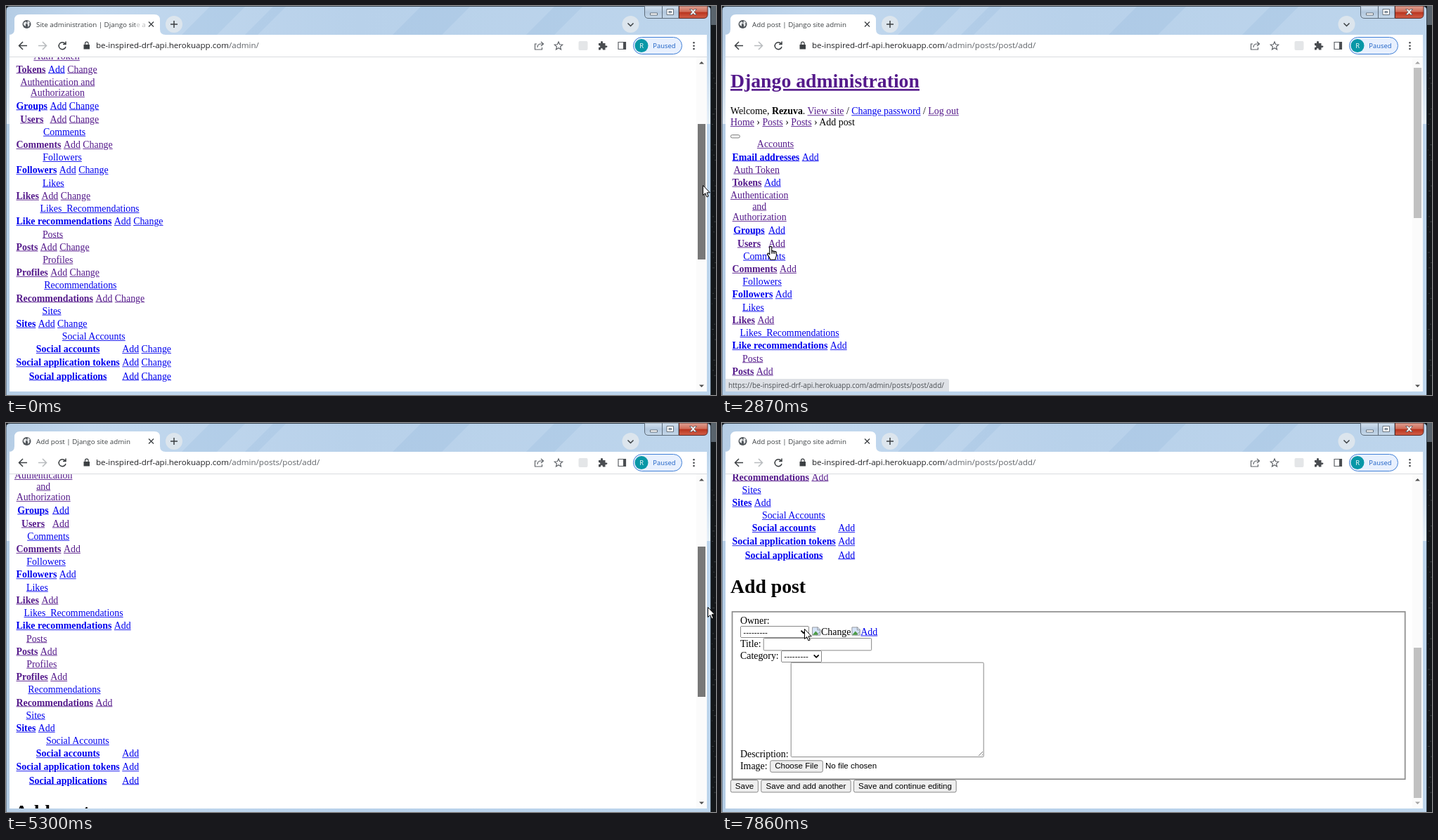
Write an HTML page that moves like this. It is 1010 by 554 pixels and loops after 8000 ms.

```html
<!DOCTYPE html>
<html lang="en">
<head>
<meta charset="utf-8">
<title>Admin walkthrough</title>
<style>
html, body { margin: 0; width: 100%; height: 100%; overflow: hidden; }
#stage { position: absolute; left: 0; top: 0; width: 1010px; height: 554px; overflow: hidden; background: #14171a; }
svg.layer { position: absolute; left: 0; top: 0; }
svg text { font-family: "Open Sans", "Noto Sans", sans-serif; }
#view { position: absolute; left: 5px; top: 73px; width: 992px; height: 476px; overflow: hidden; background: #fff; }
.page { position: absolute; left: 0; top: 0; width: 1111px; padding: 0 8px; transform-origin: 0 0;
  font: 16px/18px "Liberation Serif", "Times New Roman", serif; color: #000; }
.page h1 { font-size: 32px; line-height: 37px; margin: 21.44px 0; }
u { color: #00e; }
u.v { color: #551a8b; }
table { border-spacing: 2px; }
th, td { padding: 1px; line-height: 18px; }
.toggle { height: 18px; position: relative; }
.toggle i, button, input { box-sizing: border-box; background: #efefef; border: 1px solid #767676; border-radius: 3px; }
.toggle i { position: absolute; top: 11px; width: 16px; height: 6px; }
.at { position: absolute; white-space: pre; box-sizing: border-box; margin: 0; }
button, input, select, textarea, .sans { font: 13.333px "Liberation Sans", Arial, sans-serif; color: #000; padding: 0; }
input, textarea { background: #fff; border: 1px solid #767676; border-radius: 2px; }
.fields { border: 2px solid #8e8e8e; }
.broken { width: 16px; height: 16px; vertical-align: -2px; }
</style>
</head>
<body>
<div id="stage">
  <svg class="layer" width="1010" height="554">
    <defs>
      <linearGradient id="glass" x2="1" y2="0">
        <stop offset="0" stop-color="#b5cde5"/><stop offset=".12" stop-color="#c2d8ee"/>
        <stop offset=".5" stop-color="#b8d1ea"/><stop offset="1" stop-color="#bdd5ec"/>
      </linearGradient>
      <linearGradient id="sheen" gradientUnits="userSpaceOnUse" x1="0" y1="40" x2="0" y2="168">
        <stop offset="0" stop-color="#fff" stop-opacity="0"/><stop offset="1" stop-color="#fff" stop-opacity=".65"/>
      </linearGradient>
      <linearGradient id="close" x2="0" y2="1">
        <stop offset="0" stop-color="#e0a193"/><stop offset=".48" stop-color="#cf6b57"/>
        <stop offset=".5" stop-color="#b8321c"/><stop offset="1" stop-color="#d2614a"/>
      </linearGradient>
      <linearGradient id="cap" x2="0" y2="1">
        <stop offset="0" stop-color="#d5e3f1"/><stop offset=".5" stop-color="#b3c8de"/><stop offset="1" stop-color="#c5d8ea"/>
      </linearGradient>
    </defs>
    <path d="M1003 0h7v27h-7z" fill="#59636c"/>
    <g id="specks" fill="#50565b"></g>
    <path d="M0 554V6Q0 .5 6 .5H997Q1002.500 .5 1002.500 6V554" fill="url(#glass)" stroke="#35414d"/>
    <path d="M290 1h50l-40 40h-50zM380 1h18l-40 40h-18zM590 1h70l-40 40h-70zM780 1h40l-40 40h-40z" fill="#86aed6" opacity=".2"/>
    <path d="M1 40h4v128H1zM997 40h5v128h-5z" fill="url(#sheen)"/>
    <path d="M5 41H4Q12 41 12 33V20Q12 12 20 12H211Q219 12 219 20V33Q219 41 227 41H997V73H5z" fill="#fff"/>
    <path d="M5 72.500H997" stroke="#d9dce0"/>
    <circle cx="29.500" cy="26" r="6" fill="#50555a"/>
    <path d="M25 24l3-2 2 2-2 2v3l-3-2zM31 21l3 2-1 3 1 1-3 3v-3l-1-2z" fill="#e4e6e8"/>
    <text id="title" x="43" y="29.600" font-size="9.800" fill="#3c4043"></text>
    <path id="fade" d="M184 16h14v20h-14z" fill="#fff" opacity=".65"/>
    <path d="M203 22.500l7 7m0-7l-7 7" stroke="#3c4043" stroke-width="1.300"/>
    <g fill="#dce5ed"><circle cx="239" cy="26" r="12"/><circle cx="888.500" cy="26" r="12"/></g>
    <g fill="none" stroke="#3c4043" stroke-width="1.500">
      <path d="M234 26h10M239 21v10M884.500 24.500l4 4 4-4"/>
      <path d="M30 56.500H19M24 51l-5.500 5.500L24 62"/>
      <path d="M46 56.500H57M52 51l5.500 5.500L52 62" stroke="#b8bbbe"/>
      <path d="M84 53.500a5 5 0 1 0 1 4.500M85 50.500v4h-4"/>
      <path d="M112.500 55v-1.500a2.300 2.300 0 0 1 4.600 0V55" stroke-width="1.200"/>
      <g stroke="#5f6368" stroke-width="1.200">
        <path d="M755 54h-2.500v8h10v-3M756 59q0-5 5-5h3M761 51l3.500 3-3.500 3"/>
        <path d="M786 51l1.600 3.800 4.100.400-3.100 2.700.900 4-3.500-2.100-3.500 2.100.900-4-3.100-2.700 4.100-.400z"/>
        <path d="M871 51.500h10.500v10H871z"/>
      </g>
    </g>
    <path d="M110.500 55h8.500v6.500h-8.500z" fill="#3c4043"/>
    <path d="M878 51h4v11h-4z" fill="#4a4d51"/>
    <rect x="814.500" y="50" width="13" height="13" rx="2" fill="#e4e6e8"/>
    <path d="M843 53h3q-.500-3 1.500-3t1.500 3h3.500v3.500q3-.500 3 1.300t-3 1.400V62.500h-3.500q0-2.600-1.600-2.600t-1.600 2.600H843V59q2.400 0 2.400-1.500T843 56z" fill="#4a4d51"/>
    <g fill="#4a4d51"><circle cx="978.500" cy="52.300" r="1.300"/><circle cx="978.500" cy="56.700" r="1.300"/><circle cx="978.500" cy="61.100" r="1.300"/></g>
    <rect x="892.500" y="44.500" width="69" height="24" rx="12" fill="#e8f0fe" stroke="#3f7fd6"/>
    <circle cx="904" cy="56.500" r="9.500" fill="#0897a7"/>
    <text x="901.200" y="60" font-size="9.400" fill="#fff">R</text>
    <text x="920.300" y="59.900" font-size="9.400" fill="#1a5fc4">Paused</text>
    <text y="60.200" x="128" font-size="11.580" fill="#202124">be-inspired-drf-api.herokuapp.com<tspan id="path" fill="#5f6368"></tspan></text>
    <path d="M908.500 0V12Q908.500 17.500 914 17.500H957V0z" fill="url(#cap)" stroke="#5d6c7b"/>
    <path d="M957.500 0V17.500H992Q998 17.500 998 12V0z" fill="url(#close)" stroke="#5a2a27"/>
    <path d="M933.500 0V17" stroke="#5d6c7b"/>
    <g fill="#fff" stroke="#4c5660" stroke-width=".8">
      <path d="M916.500 10h10v3h-10z"/>
      <path d="M940 4.500h9.500v8H940zM943 7.500h3.500v2.200H943z" fill-rule="evenodd"/>
      <path d="M972.500 4.500h3l2 2 2-2h3l-3.500 4 3.500 4h-3l-2-2-2 2h-3l3.500-4z"/>
    </g>
  </svg>
  <div id="view"></div>
  <svg class="layer" width="1010" height="554">
    <path d="M982 73h15v476h-15z" fill="#fbfbfb"/>
    <path id="up" d="M986 82.500l3.500-3.500 3.500 3.500z"/>
    <path id="down" d="M986 539.500l3.500 3.500 3.500-3.500z"/>
    <rect id="thumb" x="984" width="11"/>
    <g id="status">
      <path d="M5 531H320Q323 531 323 534V549H5z" fill="#dee1e6"/>
      <text id="hint" x="9" y="543.600" font-size="9.950" fill="#4a4e53"></text>
    </g>
    <g id="cursor" fill="#fff" stroke="#000" stroke-linejoin="round">
      <path id="arrow" d="M.500.500V14.500L3.700 11.600 6 17 8.200 16 6 10.800H10.300z"/>
      <path id="hand" transform="translate(-5 -.500) scale(1.070)" d="M3.500 1.600q1.400-1.600 2.800 0V7q1.200-.800 2 .300 1.200-.700 2 .400 2-.500 2.200 1.300v4.500q-1 2-1.500 5H4.500q-1-3-4-7 0-2 1.500-1.500l1.500 1.500zM6.300 7v3.500M8.300 7.300v3.200M10.300 7.700v3"/>
    </g>
  </svg>
</div>
<script>
const $ = id => document.getElementById(id);
const LOOP = 8000, ZOOM = 0.867, SWAP = 2640;

// caption, caption visited, then rows of [label, visited flags for label/Add/Change]
const modules = [
  ['Accounts', 1, ['Email addresses', '000']],
  ['Auth Token', 1, ['Tokens', '101']],
  ['Authentication and Authorization', 1, ['Groups', '000'], ['Users', '111']],
  ['Comments', 0, ['Comments', '111']],
  ['Followers', 0, ['Followers', '000']],
  ['Likes', 0, ['Likes', '111']],
  ['Likes_Recommendations', 0, ['Like recommendations', '000']],
  ['Posts', 1, ['Posts', '111']],
  ['Profiles', 1, ['Profiles', '111']],
  ['Recommendations', 0, ['Recommendations', '111']],
  ['Sites', 0, ['Sites', '000']],
  ['Social Accounts', 0, ['Social accounts', '000'], ['Social application tokens', '000'], ['Social applications', '000']]
];
const link = (text, visited) => `<u class="${+visited ? 'v' : ''}">${text}</u>`;
const tables = actions => modules.map(([caption, seen, ...rows]) =>
  `<table><caption>${link(caption, seen)}</caption>` + rows.map(([label, flags]) =>
    `<tr><th>${link(label, flags[0])}</th>` +
    actions.map((name, i) => `<td>${link(name, flags[i + 1])}</td>`).join('') + '</tr>').join('') +
  '</table>').join('');

// Form parts are given in stage pixels at the fully scrolled position.
const box = (x, y, w, h) => `left:${(x - 5) / ZOOM}px;top:${(y + 443) / ZOOM}px;` +
  (w ? `width:${w / ZOOM}px;height:${h / ZOOM}px` : '');
const part = (tag, x, y, w, h, inner = '', cls = '') =>
  `<${tag} class="at ${cls}" tabindex="-1" style="${box(x, y, w, h)}">${inner}</${tag}>`;
const line = (x, middle, html, cls) => part('span', x, middle - 9 * ZOOM, 0, 0, html, cls);
const broken = '<svg class="broken" viewBox="0 0 16 16"><path d="M1.500 1.500h9l4 4v9h-13z" fill="#d5e3f7" stroke="#8a8d91"/>' +
  '<path d="M2 14l5-6 3 3 1 3z" fill="#4c9b45"/><path d="M10 1v5h5M8 15l7-7" fill="none" stroke="#8a8d91"/></svg>';
const dashes = '<option>---------</option>';
const form = [
  part('div', 14, 268, 959, 240, '', 'fields'),
  line(26, 282, 'Owner:'),
  part('select', 26, 289, 98, 17, dashes),
  line(127.200, 297.500, `${broken}Change<u>${broken}Add</u>`),
  line(26, 315, 'Title:'),
  part('input', 59, 306, 154, 18),
  line(26, 332, 'Category:'),
  part('select', 84, 324, 58, 17, dashes),
  part('textarea', 98, 341, 275, 135),
  line(26, 471.500, 'Description:'),
  line(26, 489, 'Image:'),
  part('button', 68, 480, 76, 17.500, 'Choose File'),
  part('span', 147, 482, 0, 0, 'No file chosen', 'sans'),
  part('button', 12, 508, 40, 18, 'Save'),
  part('button', 55, 508, 129, 18, 'Save and add another'),
  part('button', 187, 508, 147, 18, 'Save and continue editing')
].join('');

$('view').innerHTML =
  `<div class="page" id="index">${tables(['Add', 'Change'])}</div>
  <div class="page" id="edit"><h1>${link('Django administration', 1)}</h1>
  <div>Welcome, <b>Rezuva</b>. ${link('View site', 1)} / ${link('Change password', 0)} / ${link('Log out', 1)}</div>
  <div>${link('Home', 1)} › ${link('Posts', 1)} › ${link('Posts', 1)} › Add post</div>
  <div class="toggle"><i></i></div>${tables(['Add'])}<h1>Add post</h1>${form}</div>`;

// Dim text of the window behind, at the right edge
for (let i = 0; i < 60; i++) {
  const y = 95 + i * 7.300, x = 1004 + (i * 37 % 5);
  if (i % 7 < 4) $('specks').innerHTML += `<rect x="${x}" y="${y}" width="${1 + i % 3}" height="1" opacity=".6"/>`;
}

// start, end, number of steps, target x, target y
const moves = [
  [310, 490, 4, 382, 322], [760, 1110, 6, 69, 343], [1180, 1180, 1, 41, 344], [1240, 1290, 2, 37, 344],
  [1610, 1720, 3, 69, 342], [3440, 3620, 4, 613, 233], [3870, 4170, 6, 899, 157], [4360, 4760, 8, 988, 167],
  [5060, 5060, 1, 988, 169], [5120, 5300, 3, 998, 262], [5490, 5640, 3, 1008, 341], [5740, 5740, 1, 1014, 360],
  [6910, 6910, 1, 790, 385], [6970, 7040, 2, 525, 367], [7280, 7450, 4, 219, 337], [7640, 7860, 5, 117, 293]
];
const scrolls = [[0, 0], [5060, 3.500], [5120, 40], [5190, 110], [5300, 195], [5490, 280], [5560, 360],
  [5640, 416], [5740, 440], [6000, 470], [6060, 500], [6130, 516]];
const thumbColors = [[0, '#787878'], [130, '#a8a8a8'], [310, '#c1c1c1'], [4690, '#a8a8a8'], [5010, '#787878'], [6640, '#c1c1c1']];
const hints = [[0, ''], [1110, 'post/add/'], [1290, 'post/'], [1720, 'post/add/'], [3140, '']];

const current = (steps, t) => steps.reduce((value, [start, next]) => t >= start ? next : value, steps[0][1]);

function cursorAt(t) {
  let x = 991, y = 255;
  for (const [start, end, count, toX, toY] of moves) {
    if (t < start) break;
    const done = end > start ? Math.floor((t - start) / (end - start) * (count - 1) + 1e-6) + 1 : count;
    const p = Math.min(done / count, 1), ease = p * p * (3 - 2 * p);
    x += (toX - x) * ease;
    y += (toY - y) * ease;
  }
  return [x, y];
}

const show = (id, on) => { $(id).style.display = on ? '' : 'none'; };
const setText = (id, text) => { if ($(id).textContent !== text) $(id).textContent = text; };

function draw(t) {
  const editing = t >= SWAP, scroll = current(scrolls, t), hint = current(hints, t);
  show('index', !editing);
  show('edit', editing);
  show('fade', !editing);
  setText('title', editing ? 'Add post | Django site admin' : 'Site administration | Django site a');
  setText('path', editing ? '/admin/posts/post/add/' : '/admin/');
  $('index').style.transform = `translateY(-45.200px) scale(${ZOOM})`;
  $('edit').style.transform = `translateY(${-scroll}px) scale(${ZOOM})`;

  const thumb = $('thumb');
  thumb.setAttribute('y', editing ? Math.round(88 + scroll * 0.45) : 168);
  thumb.setAttribute('height', editing ? 214 : 193);
  thumb.setAttribute('fill', current(thumbColors, t));
  $('up').setAttribute('fill', editing && scroll === 0 ? '#a3a3a3' : '#505050');
  $('down').setAttribute('fill', scroll === 516 ? '#a3a3a3' : '#505050');

  show('status', hint);
  setText('hint', 'https://be-inspired-drf-api.herokuapp.com/admin/posts/' + hint);

  const [x, y] = cursorAt(t), pointing = t >= 1110 && t < 3440;
  $('cursor').setAttribute('transform', `translate(${Math.round(x)} ${Math.round(y)})`);
  show('hand', pointing);
  show('arrow', !pointing);
}

const begin = performance.now();
function tick() {
  draw((performance.now() - begin) % LOOP);
  requestAnimationFrame(tick);
}
tick();
</script>
</body>
</html>
```
